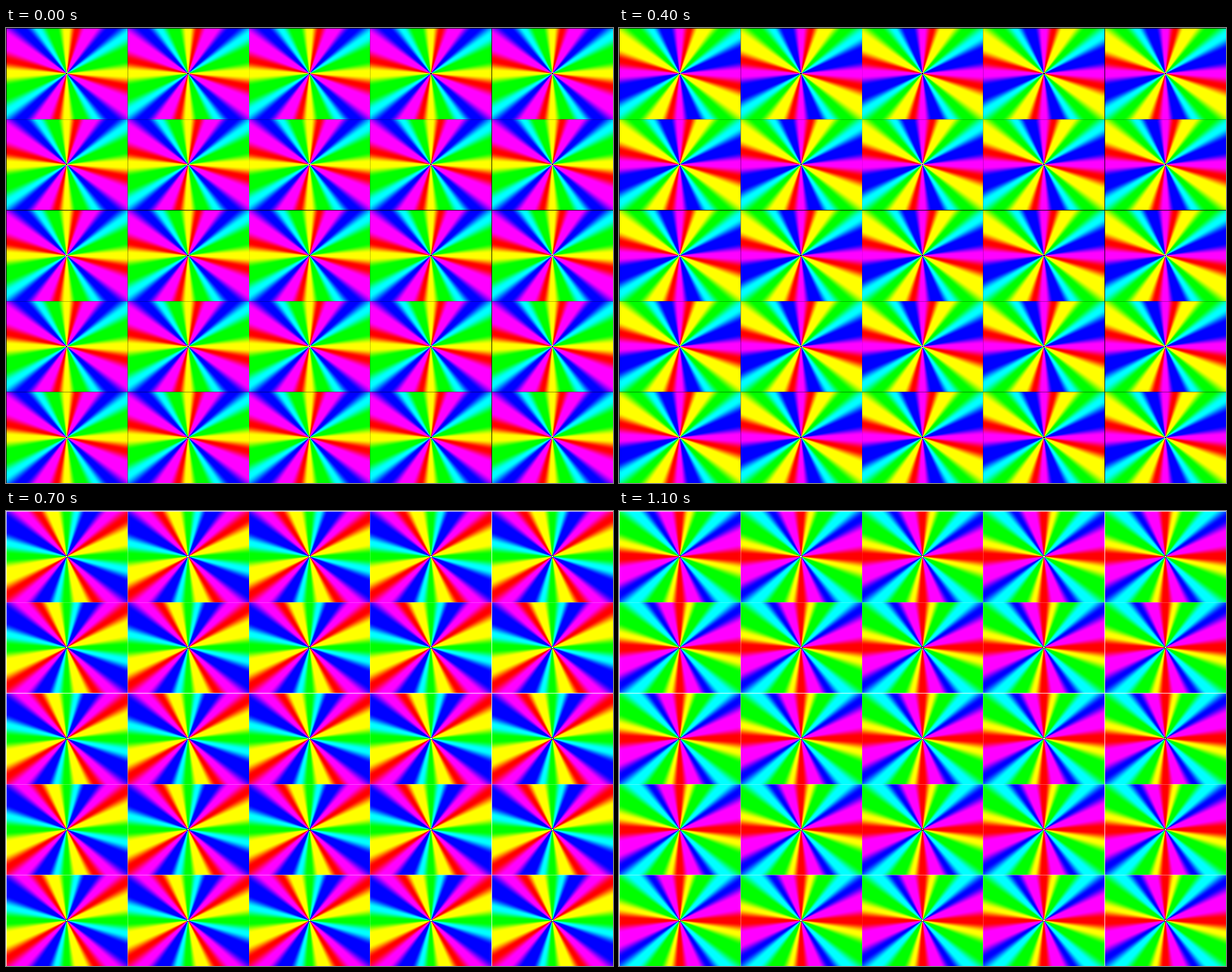
Animation, 864 px wide and 648 px high, one loop 1200 ms. Source, as an HTML page with a canvas:

```html
<!DOCTYPE html>
<html lang="en">
<head>
<meta charset="utf-8">
<title>Spectrum tiles</title>
<style>
  html, body { margin: 0; width: 100%; height: 100%; overflow: hidden; background: #000; }
  canvas { display: block; }
</style>
</head>
<body>
<canvas id="stage" width="864" height="648"></canvas>
<script>
const W = 864, H = 648, TILES = 5, STEP = 100, RAMP = 10;
const tileW = W / TILES, tileH = H / TILES;
const ctx = document.getElementById('stage').getContext('2d');

// Channel orders; the second half of the loop is also inverted.
const orders = ['RGB', 'BRG', 'GRB', 'GBR', 'RBG', 'BGR',
                'RGB', 'RBG', 'GRB', 'GBR', 'BRG', 'BGR'];

// Strength of the seam at each tile's left and top edge.
const seamX = [0.8, 0.35, 0.08, 0.2, 0.8];
const seamY = [0.8, 0.2, 0.8, 0.25, 0.4];

const smooth = (angle, mid) => {
  const t = Math.min(1, Math.max(0, (angle - mid) / RAMP + 0.5));
  return t * t * (3 - 2 * t);
};

// Each channel is a soft square wave, on for half of every quarter turn.
const pulse = (angle, rise) => smooth(angle, rise) - smooth(angle, rise + 45);

// Clockwise: yellow, red, magenta, blue, cyan, green.
const spectrum = angle => [1 - pulse(angle, 38), 1 - pulse(angle, 7), pulse(angle, 18)];

function seams(size, strengths) {
  const map = {};
  strengths.forEach((s, i) => { map[Math.round(i * size)] = s; });
  return map;
}

function basePixels() {
  const px = new Float32Array(W * H * 3);
  const columns = seams(tileW, seamX), rows = seams(tileH, seamY);
  for (let y = 0, i = 0; y < H; y++) {
    const dy = (y + 0.5) % tileH - tileH / 2;
    for (let x = 0; x < W; x++) {
      const dx = (x + 0.5) % tileW - tileW / 2;
      const angle = Math.atan2(dx, -dy) * 180 / Math.PI + 360;
      const r = Math.hypot(dx, dy);
      const shade = 1 - Math.max(columns[x] || 0, rows[y] || 0);
      for (const v of spectrum(angle % 90)) {
        const core = r < 1 ? 0 : r < 2 ? (v + 1) / 2 : v;
        px[i++] = 255 * core * shade;
      }
    }
  }
  return px;
}

const base = basePixels();
const pictures = orders.map((order, n) => {
  const image = ctx.createImageData(W, H);
  const source = [...order].map(c => 'RGB'.indexOf(c));
  const inverted = n >= 6;
  for (let i = 0; i < W * H; i++) {
    for (let c = 0; c < 3; c++) {
      const v = base[i * 3 + source[c]];
      image.data[i * 4 + c] = inverted ? 255 - v : v;
    }
    image.data[i * 4 + 3] = 255;
  }
  return image;
});

let start = null, shown = -1;
function render(now) {
  if (start === null) start = now;
  const n = Math.floor(Math.max(0, now - start) / STEP) % pictures.length;
  if (n !== shown) ctx.putImageData(pictures[shown = n], 0, 0);
  requestAnimationFrame(render);
}
render(performance.now());
</script>
</body>
</html>
```
